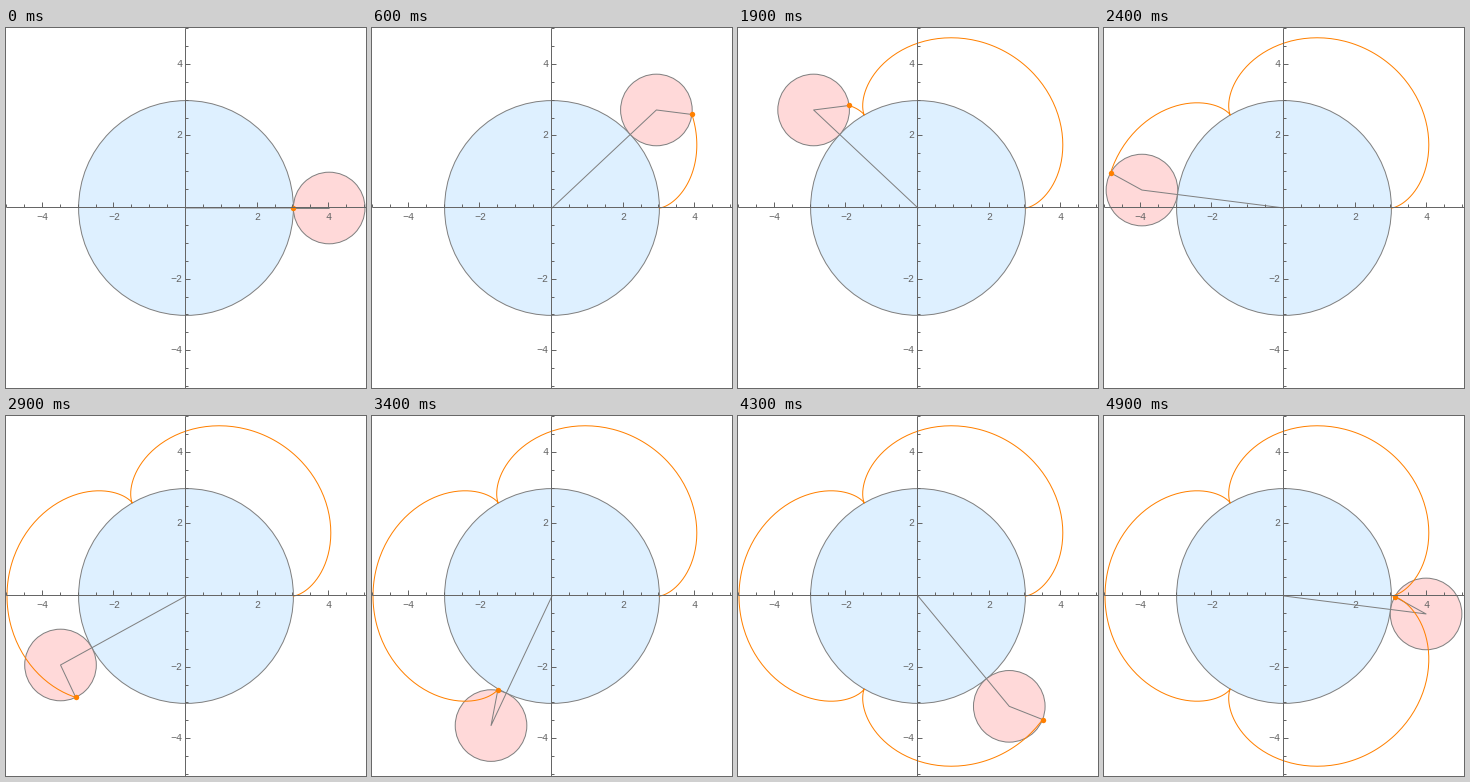
These frames come from a looping animation (360 by 360 pixels, 5000 ms). A matplotlib script:

```python
import numpy as np
import matplotlib.pyplot as plt
from matplotlib.animation import FuncAnimation
from matplotlib.patches import Circle

SIZE, DPI = 360, 100
FRAMES, INTERVAL = 50, 100
SCALE = 35.8                # pixels per unit
R, r = 3, 1
PX = 72 / DPI               # one pixel in points
GRAY, ORANGE, AXIS = "#808080", "#ff8000", "#666666"

fig = plt.figure(figsize=(SIZE / DPI, SIZE / DPI), dpi=DPI, facecolor="white")
ax = fig.add_axes([0, 0, 1, 1])
half = SIZE / 2 / SCALE
ax.set(xlim=(-half, half), ylim=(-half, half))
ax.axis("off")


def pixels(n):
    return n / SCALE


def draw_axes():
    # One pixel up and left, so that snapping lands just before the centre.
    x0, y0 = pixels(-1), pixels(1)
    style = dict(color=AXIS, lw=PX, zorder=10, snap=True, solid_capstyle="butt")
    ax.plot([-half, half], [y0, y0], **style)
    ax.plot([x0, x0], [-half, half], **style)
    for v in np.arange(-5, 5.1, 0.5):
        if v == 0:
            continue
        length = pixels(5 if v % 2 == 0 else 3)
        ax.plot([x0 + v, x0 + v], [y0, y0 + length], **style)
        ax.plot([x0, x0 + length], [y0 + v, y0 + v], **style)
    font = dict(family="Liberation Mono", size=10 * PX, color=AXIS,
                va="baseline", zorder=11)
    for v in (-4, -2, 2, 4):
        label = str(v).replace("-", "\u2212")
        ax.text(v + pixels(-0.5), pixels(-12.5), label, ha="center", **font)
        ax.text(pixels(-4), v + pixels(-2), label, ha="right", **font)


def epicycloid(t):
    k = (R + r) / r
    return ((R + r) * np.cos(t) - r * np.cos(k * t),
            (R + r) * np.sin(t) - r * np.sin(k * t))


draw_axes()
ax.add_patch(Circle((0, 0), R, fc=(0.87, 0.94, 1), ec=GRAY, lw=PX, zorder=1))
wheel = ax.add_patch(Circle((R + r, 0), r, fc=(1, 0.85, 0.85), ec=GRAY, lw=PX, zorder=2))
arm, = ax.plot([], [], color=GRAY, lw=PX, zorder=3, snap=False)
trace, = ax.plot([], [], color=ORANGE, lw=PX, zorder=4, snap=False)
pen, = ax.plot([], [], "o", color=ORANGE, ms=5.4 * PX, mew=0, zorder=5, snap=False)


def update(i):
    t = 2 * np.pi * i / FRAMES
    cx, cy = (R + r) * np.cos(t), (R + r) * np.sin(t)
    px, py = epicycloid(t)
    wheel.center = cx, cy
    arm.set_data([0, cx, px], [0, cy, py])
    trace.set_data(*epicycloid(np.linspace(0, t, 10 * i + 1)))
    pen.set_data([px], [py])
    return wheel, arm, trace, pen


anim = FuncAnimation(fig, update, frames=FRAMES, interval=INTERVAL,
                     repeat=True, repeat_delay=0)
plt.show()
```
